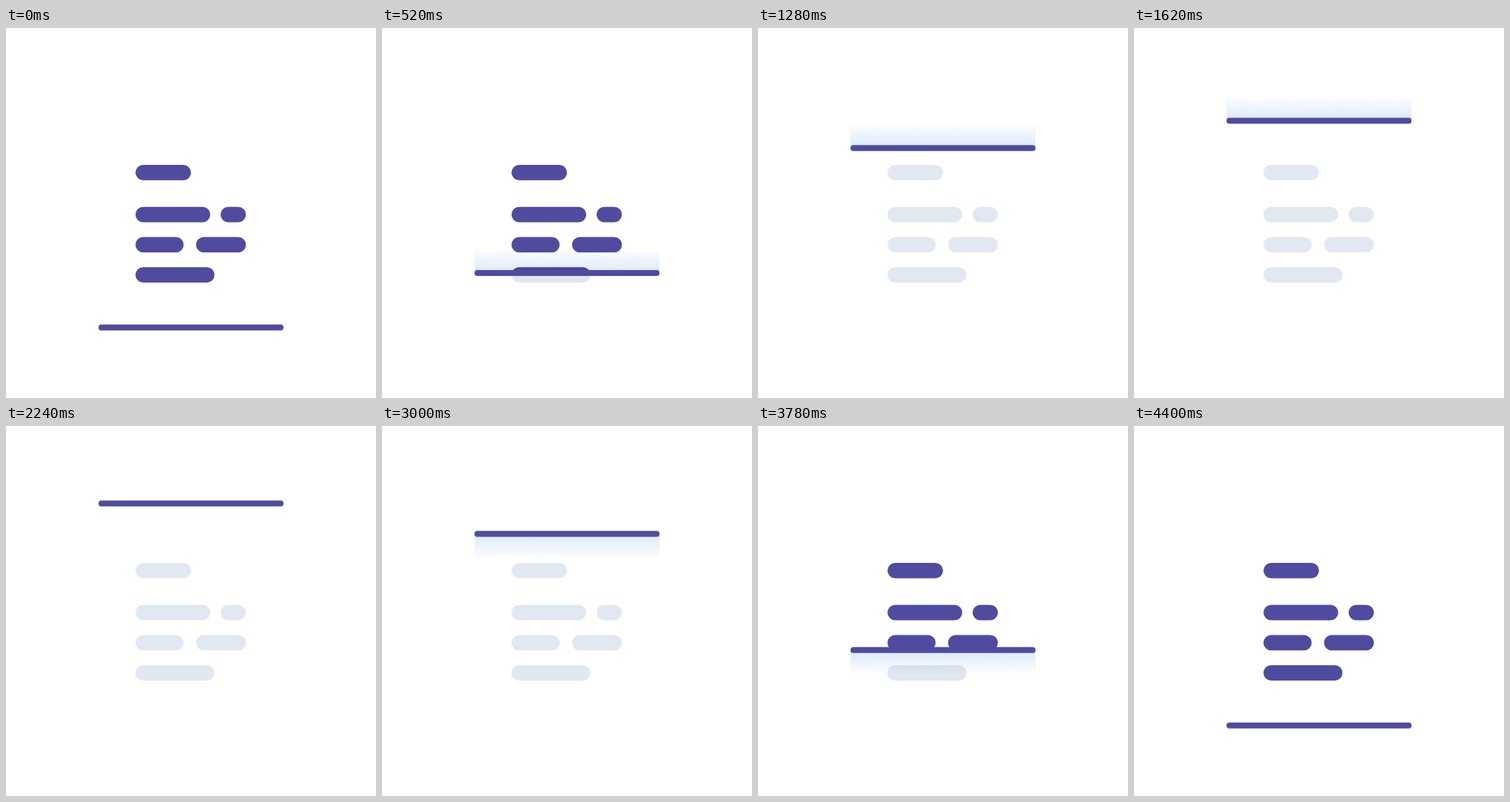
Recreate the animation shown at these times as an HTML page. Size 500 by 500 pixels, loop 4.54 s.

```html
<!DOCTYPE html>
<html lang="en">
<head>
<meta charset="utf-8">
<title>Scanning</title>
<style>
  html, body { margin: 0; width: 100%; height: 100%; overflow: hidden; background: #fff; }
  #stage { position: relative; width: 500px; height: 500px; overflow: hidden; background: #fff; isolation: isolate; }
  svg { position: absolute; inset: 0; display: block; }
  #idle { fill: #e1e8f1; }
  #lit { fill: #504b9f; }
  .beam { position: absolute; left: 125px; width: 250px; height: 34px; opacity: 0; mix-blend-mode: multiply; }
  #above { top: -34px; background: linear-gradient(to top, #dbe9f8, #fff); }
  #below { top: 0; background: linear-gradient(to bottom, #dbe9f8, #fff); }
  #line { position: absolute; left: 125px; top: -3.75px; width: 250px; height: 7.5px; border-radius: 3.75px; background: #504b9f; }
</style>
</head>
<body>
<div id="stage">
  <svg id="idle" width="500" height="500"></svg>
  <svg id="lit" width="500" height="500"></svg>
  <div id="above" class="beam"></div>
  <div id="below" class="beam"></div>
  <div id="line"></div>
</div>
<script>
  const LOOP = 4540, SWEEP = 2205;
  const LOW = 404.7, HIGH = 104.6;
  const UP = 'cubic-bezier(.28, 0, .37, 1)';
  const DOWN = 'cubic-bezier(.63, 0, .72, 1)';

  // x, y, width of each text bar
  const bars = [
    [175, 185, 75],
    [175, 241.7, 101], [290, 241.7, 34.2],
    [175, 282.5, 65], [256.8, 282.5, 67.4],
    [175, 323.3, 106.7]
  ];
  const el = id => document.getElementById(id);
  const shapes = bars.map(([x, y, w]) =>
    `<rect x="${x}" y="${y}" width="${w}" height="20.8" rx="10.4"/>`).join('');
  el('idle').innerHTML = el('lit').innerHTML = shapes;

  const timing = { duration: LOOP, iterations: Infinity };

  // Moves a property with the line: up, down, short rest
  function sweep(id, prop, at) {
    el(id).animate([
      { offset: 0, [prop]: at(LOW), easing: UP },
      { offset: SWEEP / LOOP, [prop]: at(HIGH), easing: DOWN },
      { offset: 2 * SWEEP / LOOP, [prop]: at(LOW) },
      { offset: 1, [prop]: at(LOW) }
    ], timing);
  }

  // Shows a beam during the sweep that begins at the given time
  function glow(id, start) {
    const steps = [[0, 0], [.15, 1], [.8, 1], [1, 0]];
    const frames = steps.map(([s, opacity]) => ({ offset: (start + s * SWEEP) / LOOP, opacity }));
    if (start > 0) frames.unshift({ offset: 0, opacity: 0 });
    frames.push({ offset: 1, opacity: 0 });
    el(id).animate(frames, timing);
  }

  const shift = y => `translateY(${y}px)`;
  for (const id of ['line', 'above', 'below']) sweep(id, 'transform', shift);
  sweep('lit', 'clipPath', y => `inset(0px 0px ${500 - y}px 0px)`);
  glow('above', 0);
  glow('below', SWEEP);
</script>
</body>
</html>
```
